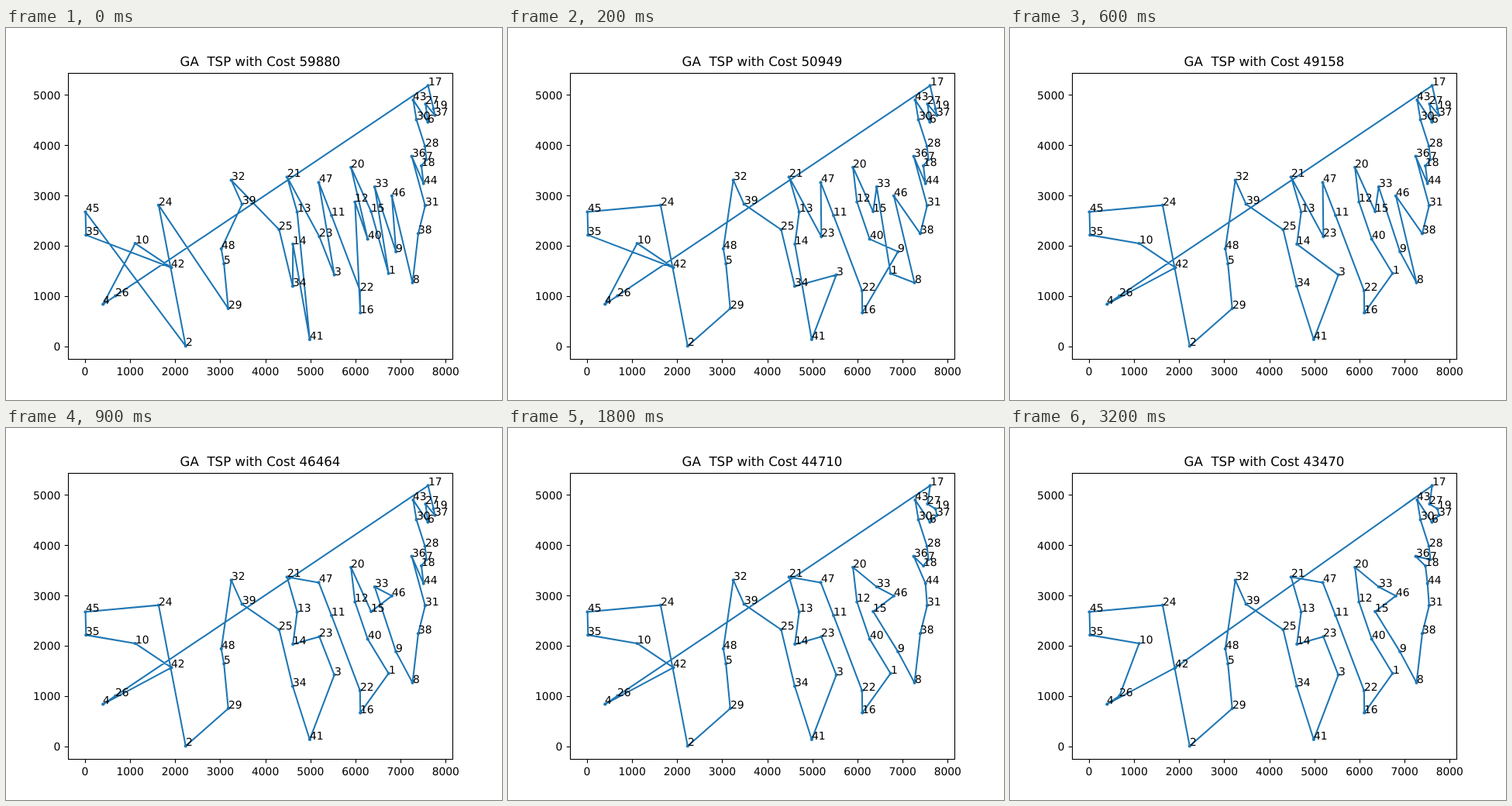
An HTML page that plays this animation: 640x480 px, repeating every 3.9 s.

```html
<!DOCTYPE html>
<html lang="en">
<head>
<meta charset="utf-8">
<title>GA TSP</title>
<style>
  html, body { margin: 0; width: 100%; height: 100%; overflow: hidden; background: #fff; }
  svg { display: block; width: 640px; height: 480px; }
  text { font: 13.89px "DejaVu Sans", sans-serif; white-space: pre; text-rendering: geometricPrecision; }
  .title { font-size: 16.67px; text-anchor: middle; }
  .frame { fill: none; stroke: #000; stroke-width: 1.11; }
  .route { fill: none; stroke: #1f77b4; stroke-width: 2.08; stroke-linejoin: round; }
  .city { fill: #1f77b4; }
</style>
</head>
<body>
<svg id="plot" viewBox="0 0 640 480"></svg>
<script>
const LOOP = 3900;

// The plotted data: city positions in label order.
const cities = `6734,1453 2233,10 5530,1424 401,841 3082,1644 7608,4458 7573,3716 7265,1268
  6898,1885 1112,2049 5468,2606 5989,2873 4706,2674 4612,2035 6347,2683 6107,669
  7611,5184 7462,3590 7732,4723 5900,3561 4483,3369 6101,1110 5199,2182 1633,2809
  4307,2322 675,1006 7555,4819 7541,3981 3177,756 7352,4506 7545,2801 3245,3305
  6426,3173 4608,1198 23,2216 7248,3779 7762,4595 7392,2244 3484,2829 6271,2135
  4985,140 1916,1569 7280,4899 7509,3239 10,2676 6807,2993 5185,3258 3023,1942`
  .split(/\s+/).map((pair, i) => {
    const [x, y] = pair.split(',').map(Number);
    return { label: i + 1, x, y };
  });
const city = label => cities[label - 1];

// Turning points of the first tour; all other cities join the leg they lengthen least.
const turns = '17 37 27 6 43 18 44 36 8 46 9 33 1 20 40 12 16 22 47 3 21 41 14 34 32 39 48 29 24 2 45 35 42 10 4'
  .split(' ').map(city);

// At each time, cities move in the tour: "a<b" puts a just before b.
const improvements = {
  100: '46<8 1<33 9<16 12<40 3<34 14<23 39<32 2<24',
  200: '14<41',
  300: '9<33 1<16',
  600: '3<41 10<42',
  800: '23<3',
  900: '46<15',
  1000: '36<44',
  1100: '27<19',
  1800: '33<20 15<46',
  1900: '26<42 4<42',
  3200: '36<18'
};

const distance = (a, b) => Math.hypot(a.x - b.x, a.y - b.y);
const after = (tour, i) => tour[(i + 1) % tour.length];
const tourLength = tour => tour.reduce((sum, c, i) => sum + distance(c, after(tour, i)), 0);

function insertCheaply(tour, c) {
  const detours = tour.map((a, i) => {
    const b = after(tour, i);
    return distance(a, c) + distance(c, b) - distance(a, b);
  });
  return tour.toSpliced(detours.indexOf(Math.min(...detours)) + 1, 0, c);
}

function move(tour, rule) {
  const [moved, next] = rule.split('<').map(city);
  const rest = tour.filter(c => c !== moved);
  return rest.toSpliced(rest.indexOf(next), 0, moved);
}

const px = x => 80 + (x + 377.6) * 496 / 8527.2;
const py = y => 427.2 - (y + 248.7) * 369.6 / 5691.4;
const snap = v => Math.round(v) + 0.5;

const makeState = (time, tour) => ({
  time: Number(time),
  title: 'GA  TSP with Cost ' + Math.floor(tourLength(tour)),
  points: tour.map(c => px(c.x).toFixed(2) + ',' + py(c.y).toFixed(2)).join(' ')
});

let tour = cities.filter(c => !turns.includes(c)).reduce(insertCheaply, turns);
const states = [makeState(0, tour)];
for (const [time, rules] of Object.entries(improvements)) {
  tour = rules.split(' ').reduce(move, tour);
  states.push(makeState(time, tour));
}

const plot = document.getElementById('plot');
function add(tag, attributes, text = '') {
  const node = document.createElementNS('http://www.w3.org/2000/svg', tag);
  for (const name in attributes) node.setAttribute(name, attributes[name]);
  node.textContent = text;
  return plot.appendChild(node);
}

for (let x = 0; x <= 8000; x += 1000) {
  add('path', { class: 'frame', d: `M${snap(px(x))} 427.5v4.86` });
  add('text', { x: px(x), y: 448, 'text-anchor': 'middle' }, x);
}
for (let y = 0; y <= 5000; y += 1000) {
  add('path', { class: 'frame', d: `M80.5 ${snap(py(y))}h-4.86` });
  add('text', { x: 70.3, y: Math.round(py(y) + 5.28), 'text-anchor': 'end' }, y);
}
const route = add('polygon', { class: 'route' });
for (const { x, y } of cities) add('circle', { class: 'city', cx: px(x), cy: py(y), r: 2.1 });
add('rect', { class: 'frame', x: 80.5, y: 58.5, width: 496, height: 369 });
for (const { label, x, y } of cities) add('text', { x: Math.round(px(x)), y: Math.round(py(y)) }, label);
const title = add('text', { class: 'title', x: 328, y: 49 });

let shown;
function draw(time) {
  const state = states.findLast(s => s.time <= time);
  if (state === shown) return;
  shown = state;
  route.setAttribute('points', state.points);
  title.textContent = state.title;
}

const start = performance.now();
function tick() {
  draw((performance.now() - start) % LOOP);
  requestAnimationFrame(tick);
}
tick();
</script>
</body>
</html>
```
